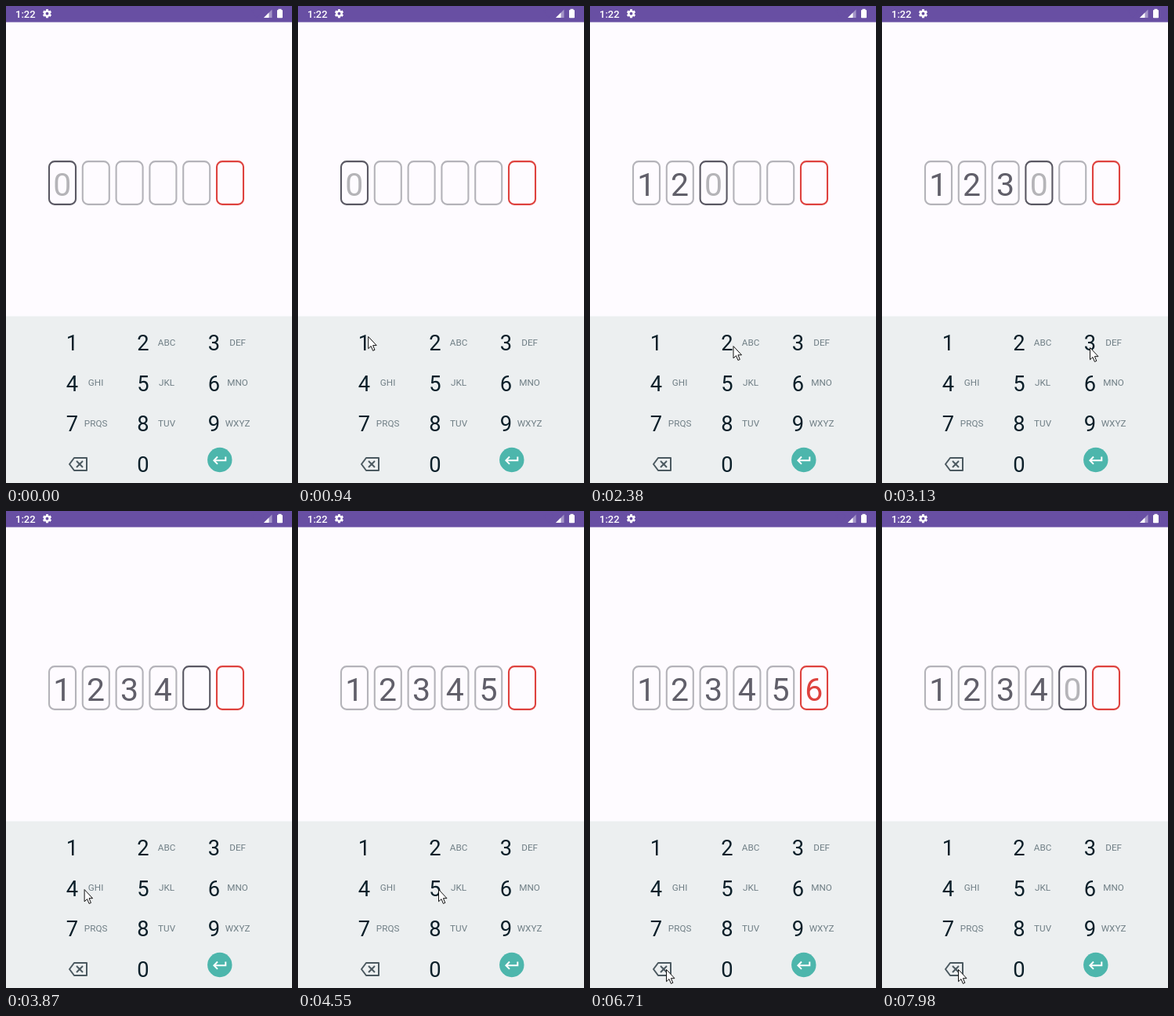
Write an HTML page with a canvas that moves like this. It is 365 px wide and 608 px high and loops after 8000 ms.

```html
<!DOCTYPE html>
<html lang="en">
<head>
<meta charset="utf-8">
<title>Code entry</title>
<style>
  html, body { margin: 0; width: 100%; height: 100%; overflow: hidden; background: #fefbff; }
  canvas { display: block; width: 365px; height: 608px; }
</style>
</head>
<body>
<canvas id="stage"></canvas>
<script>
const W = 365, H = 608, LOOP = 8000, TICK = 70;
const canvas = document.getElementById('stage');
const ctx = canvas.getContext('2d');
const dpr = window.devicePixelRatio || 1;
canvas.width = W * dpr;
canvas.height = H * dpr;

const FONT = 'Roboto, "Noto Sans", sans-serif';
const COL = {
  bar: '#684fa3', page: '#fefbff', pad: '#eceff0', lit: '#dae0e0',
  digit: '#0b1f29', letters: '#6f7e85', icon: '#4b5960', enter: '#4db6ac',
  slot: '#b4b3b9', focus: '#5a5863', value: '#615f6a', hint: '#b5b4b8',
  last: '#de423e', press: 'rgba(240,235,25,.62)'
};
const LETTERS = ['', 'ABC', 'DEF', 'GHI', 'JKL', 'MNO', 'PRQS', 'TUV', 'WXYZ'];
const BACK = 9;

// The pointer travels to x, y from `go` to `arrive` along a path pulled
// towards `via`, then presses the key at `down` for `hold` ms.
const START = { x: 261, y: 535 };
const TAPS = [
  { key: 0, x: 83, y: 434, go: 520, arrive: 1080, via: [130, 319], down: 1590, hold: 50 - 10 },
  { key: 1, x: 177, y: 433, go: 1710, arrive: 1910, down: 2240, hold: 10 },
  { key: 2, x: 265, y: 435, go: 2310, arrive: 2590, down: 2860, hold: 70 },
  { key: 3, x: 97, y: 482, go: 3070, arrive: 3610, via: [-24, 470], down: 3740, hold: 60 },
  { key: 4, x: 179, y: 482, go: 3800, arrive: 4150, down: 4420, hold: 60 },
  { key: 5, x: 268, y: 480, go: 4550, arrive: 4750, down: 5350, hold: 80 },
  { key: BACK, x: 97, y: 584, go: 6160, arrive: 6710, via: [300, 560], down: 7110, hold: 60 },
  { key: BACK, x: 97, y: 584, go: 7310, arrive: 7380, down: 7770, hold: 70 }
];
const entryTime = tap => tap.down + tap.hold + TICK;
const within = (t, a, b) => t >= a && t < b;
const ease = u => u < 0.5 ? 4 * u ** 3 : 1 - 4 * (1 - u) ** 3;

function pointerAt(t) {
  const i = TAPS.filter(tap => tap.go <= t).length - 1;
  if (i < 0) return null;
  const to = TAPS[i], from = TAPS[i - 1] || START;
  const [cx, cy] = to.via || [(from.x + to.x) / 2, (from.y + to.y) / 2];
  // the pointer is sampled once per tick
  const span = to.arrive - to.go;
  const steps = Math.round(span / TICK);
  const u = ease(Math.floor(Math.min(1, (t - to.go) / span) * steps + 1e-6) / steps);
  const bend = (a, c, b) => (1 - u) ** 2 * a + 2 * u * (1 - u) * c + u * u * b;
  return [bend(from.x, cx, to.x), bend(from.y, cy, to.y)];
}

function codeAt(t) {
  let code = '', since = -LOOP;
  for (const tap of TAPS) {
    if (entryTime(tap) > t) break;
    since = entryTime(tap);
    code = tap.key === BACK ? code.slice(0, -1) : code + (tap.key + 1);
  }
  return { code, hinted: t - since >= TICK - 10 };
}

function text(str, x, y, size, color, weight = 400, align = 'center') {
  ctx.font = `${weight} ${size}px ${FONT}`;
  ctx.textAlign = align;
  ctx.fillStyle = color;
  ctx.fillText(str, x, y);
}

function trace(points, close) {
  ctx.beginPath();
  points.forEach(([x, y]) => ctx.lineTo(x, y));
  if (close) ctx.closePath();
}

function disc(x, y, r, color) {
  ctx.beginPath();
  ctx.arc(x, y, r, 0, Math.PI * 2);
  ctx.fillStyle = color;
  ctx.fill();
}

function rect(x, y, w, h, color) {
  ctx.fillStyle = color;
  ctx.fillRect(x, y, w, h);
}

function roundRect(x, y, w, h, r) {
  ctx.beginPath();
  ctx.roundRect(x, y, w, h, r);
}

function drawGear(x, y) {
  ctx.save();
  ctx.translate(x, y);
  for (let i = 0; i < 6; i++) {
    rect(-1.5, -5.6, 3, 3, '#fff');
    ctx.rotate(Math.PI / 3);
  }
  ctx.restore();
  disc(x, y, 4.3, '#fff');
  disc(x, y, 1.9, COL.bar);
}

function drawSignal(size, color) {
  trace([[329, 15], [329 + size, 15], [329 + size, 15 - size]], true);
  ctx.fillStyle = color;
  ctx.fill();
}

function drawStatus() {
  rect(0, 0, W, 20.6, COL.bar);
  text('1:22', 12, 14.6, 13, '#fff', 500, 'left');
  drawGear(52.5, 9.7);

  ctx.beginPath();
  ctx.moveTo(320, 14.6);
  ctx.lineTo(313, 6.4);
  ctx.quadraticCurveTo(320, 1.8, 327, 6.4);
  ctx.fill();
  drawSignal(10.5, 'rgba(255,255,255,.4)');
  drawSignal(6.5, '#fff');
  rect(347.5, 3.8, 4, 2, '#fff');
  roundRect(346, 5, 7, 10.2, 0.8);
  ctx.fill();
}

function drawSlots(t) {
  const { code, hinted } = codeAt(t);
  for (let i = 0; i < 6; i++) {
    const x = 54 + i * 42.8;
    const isLast = i === 5;
    roundRect(x + 1, 198.1, 34, 54.8, 7);
    ctx.lineWidth = 2.1;
    ctx.strokeStyle = isLast ? COL.last : i === code.length ? COL.focus : COL.slot;
    ctx.stroke();

    const glyph = code[i] || (hinted && i === code.length ? '0' : '');
    const color = isLast ? COL.last : code[i] ? COL.value : COL.hint;
    text(glyph, x + 17.8, 242, 41, color);
  }
}

function drawBackspace(x, y) {
  ctx.strokeStyle = COL.icon;
  ctx.lineWidth = 2;
  ctx.lineJoin = 'round';
  trace([[x - 11, y], [x - 5, y - 8], [x + 11, y - 8], [x + 11, y + 8], [x - 5, y + 8]], true);
  ctx.stroke();
  for (const s of [-4, 4]) {
    trace([[x - 2, y - s], [x + 6, y + s]]);
    ctx.stroke();
  }
}

function drawEnter(x, y) {
  disc(x, y, 15.7, COL.enter);
  ctx.strokeStyle = '#fff';
  ctx.lineWidth = 2;
  ctx.lineJoin = 'miter';
  trace([[x + 7.5, y - 4], [x + 7.5, y + 0.7], [x - 6.8, y + 0.7]]);
  ctx.stroke();
  trace([[x - 2.8, y - 4], [x - 7.4, y + 0.7], [x - 2.8, y + 5.4]]);
  ctx.stroke();
}

function drawPad(t) {
  const keyW = 90.5, keyH = 51.7;
  const cell = key => [(key % 3) * keyW, Math.floor(key / 3) * keyH];
  rect(0, 395.5, W, H - 395.5, COL.pad);
  for (const tap of TAPS) {
    if (!within(t, tap.down, entryTime(tap))) continue;
    const [dx, dy] = cell(tap.key);
    rect(46.8 + dx, 402 + dy, keyW, keyH, COL.lit);
  }
  LETTERS.forEach((letters, i) => {
    const [dx, dy] = cell(i);
    text(i + 1, 84.3 + dx, 438.9 + dy, 27.3, COL.digit);
    text(letters, 114.6 + dx, 432.6 + dy, 11.7, COL.letters);
  });
  text('0', 84.3 + keyW, 438.9 + 3 * keyH, 27.3, COL.digit);
  drawBackspace(92, 584);
  drawEnter(272.8, 578.5);
}

function drawPointer(t) {
  const pos = pointerAt(t);
  if (!pos) return;
  const [x, y] = pos;
  if (TAPS.some(tap => within(t, tap.down, tap.down + tap.hold))) disc(x, y, 11.5, COL.press);
  const arrow = [[0.5, 0.5], [0.5, 15.8], [4, 12.6], [6.4, 18.4], [8.8, 17.4], [6.4, 11.7], [11, 11.7]];
  trace(arrow.map(([px, py]) => [x + px, y + py]), true);
  ctx.fillStyle = '#fff';
  ctx.fill();
  ctx.strokeStyle = '#111';
  ctx.lineWidth = 1;
  ctx.lineJoin = 'miter';
  ctx.stroke();
}

function draw(t) {
  ctx.setTransform(dpr, 0, 0, dpr, 0, 0);
  rect(0, 0, W, H, COL.page);
  drawStatus();
  drawSlots(t);
  drawPad(t);
  drawPointer(t);
}

function tick() {
  draw(performance.now() % LOOP);
  requestAnimationFrame(tick);
}
tick();
</script>
</body>
</html>
```
